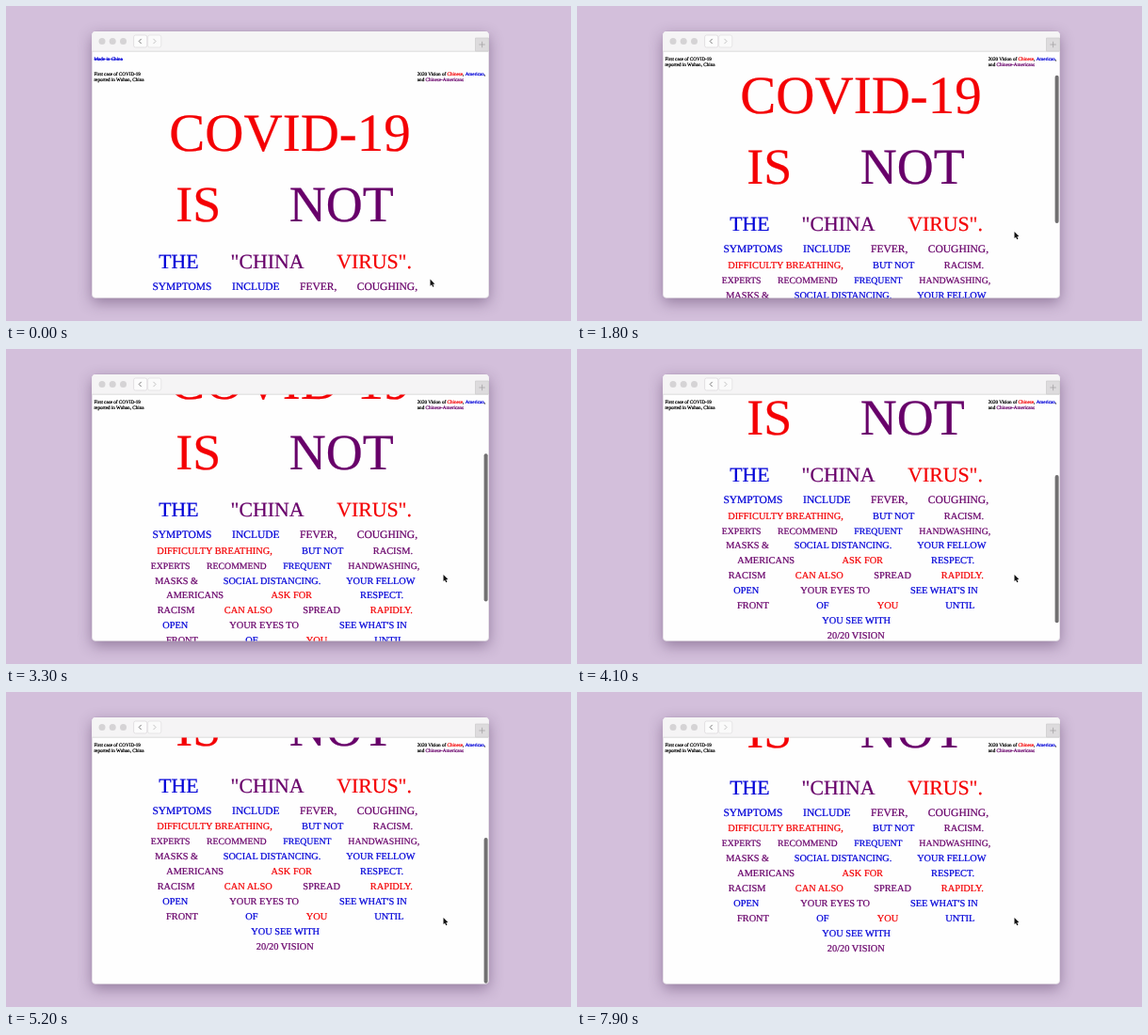
Recreate the animation shown at these times as an HTML page with a canvas. Size 600x335 px, loop 8 s.

```html
<!DOCTYPE html>
<html lang="en">
<head>
<meta charset="utf-8">
<title>Scrolling page</title>
<style>
  html, body { margin: 0; width: 100%; height: 100%; overflow: hidden; background: #d3bfdb; }
  canvas { display: block; width: 600px; height: 335px; }
</style>
</head>
<body>
<canvas id="stage"></canvas>
<script>
const W = 600, H = 335, LOOP = 8000;
const canvas = document.getElementById('stage');
const ctx = canvas.getContext('2d');
const dpr = window.devicePixelRatio || 1;
canvas.width = W * dpr;
canvas.height = H * dpr;

const INK = { r: '#f40004', b: '#0000d8', p: '#68006a', k: '#000' };
const WIN = { x: 91.3, y: 27, w: 421.4, h: 283.5, bar: 21.5 };
const MAX_SCROLL = 170.5;

// Each row: font size, baseline, then words as [text, x, ink]
const ROWS = [
  [57, 153.8, ['COVID-19', 173.3, 'r']],
  [54, 229.4, ['IS', 180.2, 'r'], ['NOT', 300.8, 'p']],
  [21.8, 279, ['THE', 162.2, 'b'], ['"CHINA', 238.5, 'p'], ['VIRUS".', 351.2, 'r']],
  [11.5, 302, ['SYMPTOMS', 155.4, 'b'], ['INCLUDE', 240.1, 'b'], ['FEVER,', 312, 'p'], ['COUGHING,', 372.8, 'p']],
  [10.33, 318.9, ['DIFFICULTY BREATHING,', 160.2, 'r'], ['BUT NOT', 314, 'b'], ['RACISM.', 389.8, 'p']],
  [9.8, 334.8, ['EXPERTS', 153.7, 'p'], ['RECOMMEND', 213, 'p'], ['FREQUENT', 294.3, 'b'], ['HANDWASHING,', 363.3, 'p']],
  [10.25, 350.6, ['MASKS &', 158.2, 'p'], ['SOCIAL DISTANCING.', 230.7, 'b'], ['YOUR FELLOW', 361.2, 'b']],
  [10.35, 366.2, ['AMERICANS', 170.2, 'p'], ['ASK FOR', 281.6, 'r'], ['RESPECT.', 376, 'b']],
  [10.35, 382.2, ['RACISM', 160.7, 'p'], ['CAN ALSO', 231.8, 'r'], ['SPREAD', 315.2, 'p'], ['RAPIDLY.', 386.8, 'r']],
  [10.35, 398.2, ['OPEN', 166.2, 'b'], ['YOUR EYES TO', 237.2, 'p'], ["SEE WHAT'S IN", 354, 'b']],
  [10.35, 414.2, ['FRONT', 170, 'p'], ['OF', 254.2, 'b'], ['YOU', 318.7, 'r'], ['UNTIL', 391.3, 'b']],
  [10.35, 430.2, ['YOU SEE WITH', 260.2, 'b']],
  [10.35, 446.2, ['20/20 VISION', 265.8, 'p']]
];

// Flicks of the page: [time, offset], with a held overscroll at the end
const SCROLL = [
  [950, 0], [1350, 14], [1800, 40], [2200, 58], [2550, 67], [2800, 69], [3000, 77],
  [3300, 101], [3550, 131], [3700, 137], [4000, 138], [4500, 138.5], [4750, 150],
  [5000, 168], [5200, 172.5], [6350, 172], [7000, MAX_SCROLL]
];

const clamp = (v, a = 0, b = 1) => Math.min(b, Math.max(a, v));
const ease = u => u * u * (3 - 2 * u);

// Monotone cubic track through a few points
function track(pts, t) {
  const n = pts.length - 1;
  if (t <= pts[0][0]) return pts[0][1];
  if (t >= pts[n][0]) return pts[n][1];
  const slope = i => (pts[i + 1][1] - pts[i][1]) / (pts[i + 1][0] - pts[i][0]);
  const tangent = i => {
    if (i === 0 || i === n) return 0;
    const a = slope(i - 1), b = slope(i);
    return a * b <= 0 ? 0 : 2 * a * b / (a + b);
  };
  let i = 0;
  while (t > pts[i + 1][0]) i++;
  const d = pts[i + 1][0] - pts[i][0], u = (t - pts[i][0]) / d, v = 1 - u;
  return pts[i][1] * v * v * (1 + 2 * u) + pts[i + 1][1] * u * u * (3 - 2 * u)
    + d * u * v * (tangent(i) * v - tangent(i + 1) * u);
}

function box(x, y, w, h, r, fill, stroke) {
  ctx.beginPath();
  ctx.roundRect(x, y, w, h, r);
  if (fill) { ctx.fillStyle = fill; ctx.fill(); }
  if (stroke) { ctx.strokeStyle = stroke; ctx.lineWidth = 0.7; ctx.stroke(); }
}

function line(pts, color, width) {
  ctx.beginPath();
  pts.forEach(([x, y]) => ctx.lineTo(x, y));
  ctx.strokeStyle = color;
  ctx.lineWidth = width;
  ctx.stroke();
}

function setFont(size) {
  ctx.font = size + 'px "Liberation Serif", "Times New Roman", Times, serif';
  ctx.textRendering = 'geometricPrecision';
}

// A hairline outline gives the slightly heavy weight of smoothed text
function text(str, x, y, ink) {
  ctx.fillStyle = ctx.strokeStyle = INK[ink];
  ctx.lineWidth = 0.22;
  ctx.lineJoin = 'round';
  ctx.fillText(str, x, y);
  ctx.strokeText(str, x, y);
  return x + ctx.measureText(str).width;
}

function runs(x, y, parts) {
  parts.forEach(([str, ink]) => { x = text(str, x, y, ink); });
}

function drawWindow() {
  const { x, y, w, h, bar } = WIN;
  ctx.save();
  ctx.shadowColor = 'rgba(60, 30, 75, 0.42)';
  ctx.shadowBlur = 15 * dpr;
  ctx.shadowOffsetY = 5 * dpr;
  box(x, y, w, h, 4, '#fff');
  ctx.restore();
  box(x, y, w, h, 4, '#fefefe', 'rgba(120, 100, 130, 0.25)');
  box(x, y, w, bar, [4, 4, 0, 0], '#f5f4f5');
  line([[x, y + bar - 0.3], [x + w, y + bar - 0.3]], '#d2d0d2', 0.7);

  for (const cx of [102, 113.2, 124.5]) box(cx - 3.5, 34, 7, 7, 3.5, '#d5d3d5');
  box(135.6, 31, 14.2, 13, 2, '#fcfcfc', '#d8d6d8');
  box(150.6, 31, 14.2, 13, 2, '#fafafa', '#e0dee0');
  line([[143.7, 34.9], [141.2, 37.5], [143.7, 40.1]], '#6b6b6b', 0.9);
  line([[156.5, 34.9], [159, 37.5], [156.5, 40.1]], '#bdbdbd', 0.9);

  box(498.5, 34, 14, 14, 0, '#dddbdd', '#cccacc');
  line([[502.4, 41], [508.8, 41]], '#a5a3a5', 0.8);
  line([[505.6, 37.8], [505.6, 44.2]], '#a5a3a5', 0.8);
}

function drawPage(s) {
  const top = WIN.y + WIN.bar;
  ctx.save();
  ctx.beginPath();
  ctx.roundRect(WIN.x, top, WIN.w, WIN.h - WIN.bar, [0, 0, 4, 4]);
  ctx.clip();

  for (const [size, y, ...words] of ROWS) {
    setFont(size);
    for (const [str, x, ink] of words) text(str, x, y - s, ink);
  }

  setFont(5.15);
  const end = text('Made in China', 93.4, 58.2 - s, 'b');
  line([[93.4, 56.6 - s], [end, 56.6 - s]], INK.b, 0.6);

  const y = 74.3 - Math.min(s, 16);
  text('First case of COVID-19', 93.4, y, 'k');
  text('reported in Wuhan, China', 93.4, y + 5.6, 'k');
  runs(436.8, y, [['2020 Vision of ', 'k'], ['Chinese', 'r'], [', ', 'k'], ['American', 'b'], [',', 'k']]);
  runs(436.8, y + 5.6, [['and ', 'k'], ['Chinese-Americans', 'p']]);
  ctx.restore();
}

function drawScrollbar(s, t) {
  const alpha = clamp((t - 950) / 150) * (1 - clamp((t - 7300) / 350));
  if (alpha <= 0) return;
  const over = Math.max(0, s - MAX_SCROLL);
  const y = 49.2 + Math.min(s, MAX_SCROLL) * 0.614 + over * 0.5;
  ctx.globalAlpha = alpha;
  box(507.6, y, 4, Math.min(157.2, 309.7 - y), 2, '#717071');
  ctx.globalAlpha = 1;
}

function drawPointer(t) {
  const u = ease(clamp((t - 200) / 700));
  ctx.save();
  ctx.translate(450.5 + 14 * u, 290.6 - 50.6 * u);
  ctx.scale(0.88, 0.88);
  ctx.beginPath();
  [[0, 0], [0, 8], [1.8, 6.4], [3.1, 9.4], [4.5, 8.8], [3.2, 5.9], [5.6, 5.8]]
    .forEach(([x, y]) => ctx.lineTo(x, y));
  ctx.closePath();
  ctx.lineJoin = 'round';
  ctx.lineWidth = 1.2;
  ctx.strokeStyle = '#fff';
  ctx.stroke();
  ctx.fillStyle = '#111';
  ctx.fill();
  ctx.restore();
}

function draw(t) {
  const s = track(SCROLL, t);
  ctx.setTransform(dpr, 0, 0, dpr, 0, 0);
  ctx.fillStyle = '#d3bfdb';
  ctx.fillRect(0, 0, W, H);
  drawWindow();
  drawPage(s);
  drawScrollbar(s, t);
  drawPointer(t);
}

const start = performance.now();
function tick() {
  draw((performance.now() - start) % LOOP);
  requestAnimationFrame(tick);
}
tick();
</script>
</body>
</html>
```
